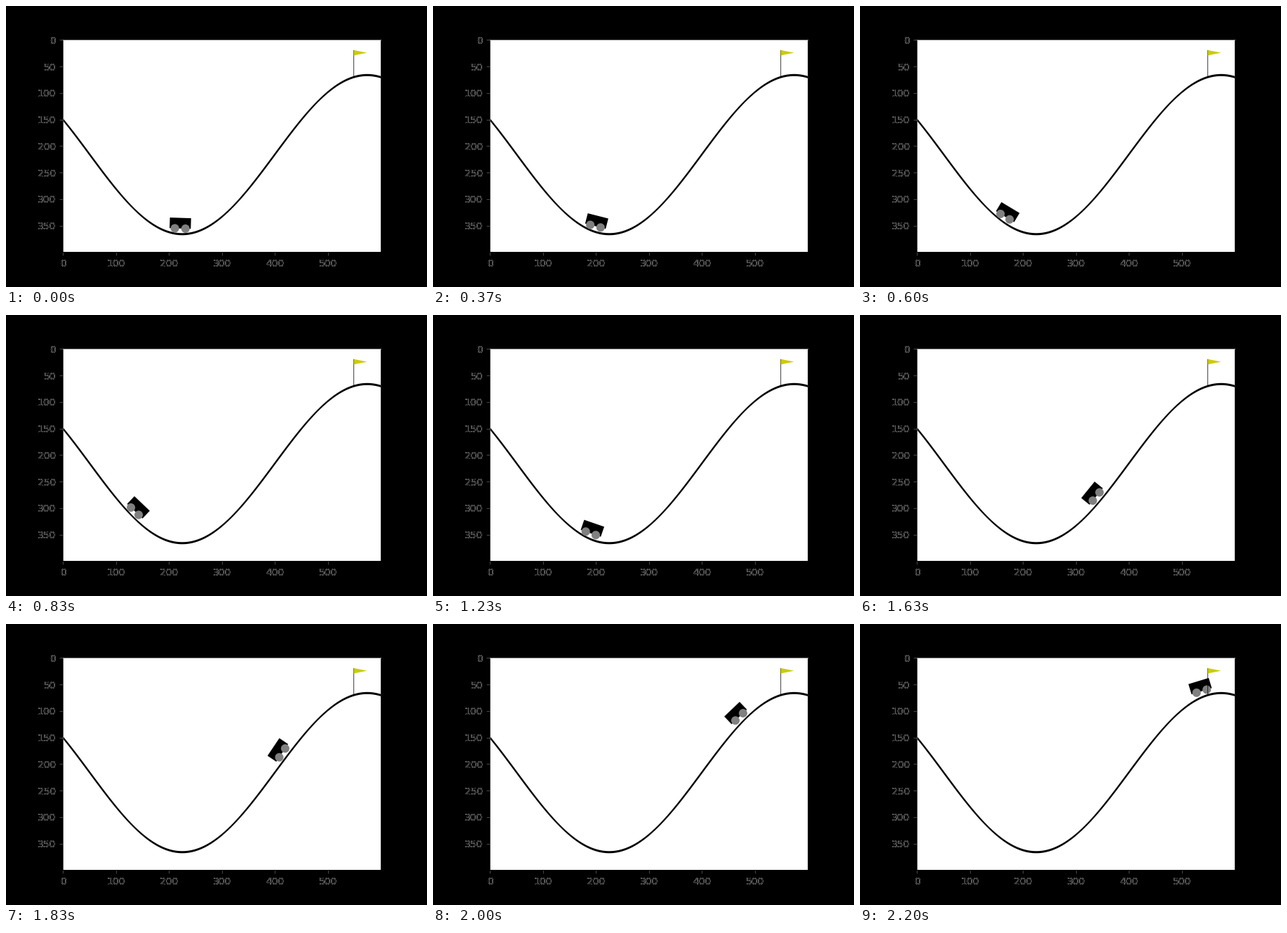
These frames come from a looping animation (600 by 400 pixels, 2.23 s). A matplotlib script:

```python
import numpy as np
import matplotlib.pyplot as plt
from matplotlib.animation import FuncAnimation
from matplotlib.patches import Circle, Polygon, Rectangle
from matplotlib.transforms import Affine2D

plt.rcParams["font.family"] = "DejaVu Sans"

WIDTH, HEIGHT = 600, 400
MIN_POS, MAX_POS = -1.2, 0.6
SCALE = WIDTH / (MAX_POS - MIN_POS)
NUDGE = 0.7  # the scene sits this far up and left of the tick grid
GOAL = 0.45
START, TURN, STEPS = -0.5345, 20.6, 65
POWER, GRAVITY = 0.0015, 0.0025
TICK_MS, LOOP_MS = 10, 2230
PX = 0.72  # one pixel in points at 100 dpi
DIM = "#444444"
SPINES = {"top": "#999999", "left": "#555555",
          "right": "#222222", "bottom": "black"}


def to_x(pos):
    return (pos - MIN_POS) * SCALE - NUDGE


def to_y(pos):
    return (0.45 * np.sin(3 * pos) + 0.55) * SCALE + NUDGE


def drive():
    """Back up the left slope, then full throttle to the right."""
    pos, speed = START, 0.0
    path = [pos]
    for step in range(STEPS):
        force = np.clip(2 * (step - TURN), -1, 1)
        speed += force * POWER - GRAVITY * np.cos(3 * pos)
        pos += speed
        path.append(pos)
    return path


def add_label(ax, value, xy, offset, ha, va):
    # Black over white leaves only a dim outline of each digit.
    for color in ("white", "white", (0, 0, 0, 0.9)):
        ax.annotate(str(value), xy, xytext=offset, textcoords="offset points",
                    ha=ha, va=va, fontsize=10, color=color,
                    annotation_clip=False)


def draw_axes(ax):
    ax.set(xlim=(0, WIDTH), ylim=(0, HEIGHT))
    x_values, y_values = range(0, WIDTH, 100), range(0, HEIGHT, 50)
    ax.set_xticks([v + 0.5 for v in x_values], [])
    ax.set_yticks([HEIGHT - v - 0.5 for v in y_values], [])
    ax.tick_params(color=DIM)
    for side, color in SPINES.items():
        ax.spines[side].set(color=color, linewidth=PX)
    for v in x_values:
        add_label(ax, v, (v + 0.5, 0), (0, -7), "center", "top")
    for v in y_values:
        add_label(ax, v, (0, HEIGHT - v - 0.5), (-7, 0), "right",
                  "center_baseline")


def draw_track(ax):
    pos = np.linspace(MIN_POS, MAX_POS + 0.01, 100)
    # The pen is 4 units wide along the minor axis of each segment.
    half = 2 * np.maximum(1, np.abs(1.35 * np.cos(3 * pos)))
    ax.fill_between(to_x(pos), to_y(pos) - half, to_y(pos) + half,
                    color="black", lw=0, zorder=1)


def draw_flag(ax):
    x, base = to_x(GOAL), to_y(GOAL)
    top = base + 50
    ax.plot([x, x], [base, top], color="black", lw=0.755 * PX,
            snap=False, solid_capstyle="butt", zorder=3)
    ax.add_patch(Polygon([(x, top), (x, top - 10), (x + 25, top - 5)],
                         color=(0.8, 0.8, 0), lw=0, zorder=3))


def make_car(ax):
    parts = [Rectangle((-20, 10), 40, 20, color="black", lw=0, zorder=2)]
    parts += [Circle((x, 10), 8, color="0.5", lw=0, zorder=2.1)
              for x in (10, -10)]
    for part in parts:
        ax.add_patch(part)
    return parts


fig = plt.figure(figsize=(6, 4), dpi=100, facecolor="black")
ax = fig.add_axes([81 / 600, 50 / 400, 453 / 600, 302 / 400])
draw_axes(ax)
draw_track(ax)
car = make_car(ax)
draw_flag(ax)
path = drive()


def update(tick):
    # Thirty poses a second, with the first one held twice as long.
    pose = max(0, (3 * tick + 1) // 10 - 1)
    pos = path[pose]
    place = (Affine2D().rotate(np.cos(3 * pos))
             .translate(to_x(pos), to_y(pos)) + ax.transData)
    for part in car:
        part.set_transform(place)
    return car


anim = FuncAnimation(fig, update, frames=LOOP_MS // TICK_MS,
                     interval=TICK_MS, repeat=True, repeat_delay=0)
plt.show()
```
